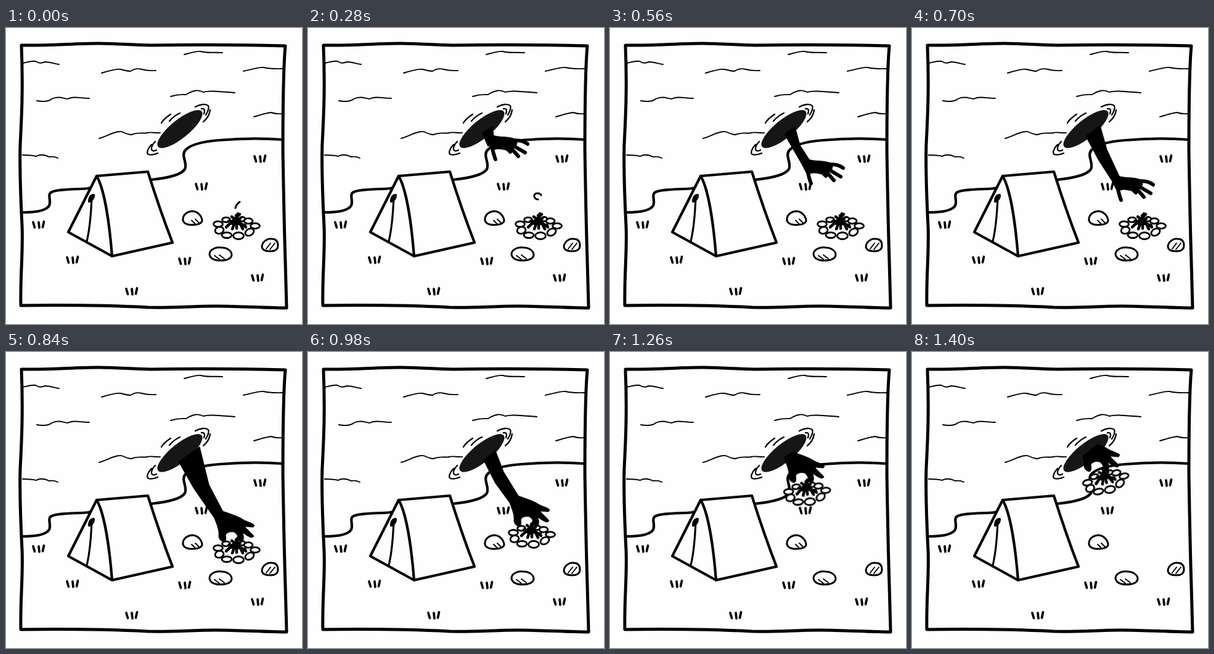
Write an HTML page that moves like this. It is 480 by 480 pixels and loops after 1540 ms.

```html
<!DOCTYPE html>
<html lang="en">
<head>
<meta charset="utf-8">
<title>Campfire thief</title>
<style>
html, body { margin: 0; width: 100%; height: 100%; overflow: hidden; background: #fefefe; }
svg { display: block; width: 100%; height: 100%; }
.ink { fill: none; stroke: #000; stroke-linecap: round; stroke-linejoin: round; }
.paper { fill: #fefefe; }
.solid { fill: #000; }
.thin { stroke-width: 1.9; }
.mid { stroke-width: 3; }
.bold { stroke-width: 4.2; }

/* Eleven held poses of 140 ms each */
.fire, .open, .grab, .arm, .smoke { animation: 1540ms step-end infinite; }
.fire { animation-name: fire; transform-origin: 374px 323px; }
.open { animation-name: open; }
.grab { animation-name: grab; }
.arm { animation-name: arm; }
.smoke { animation-name: smoke; }

@keyframes fire {
  0% { transform: none; }
  63.63% { transform: translate(-11px, -25px); }
  72.72% { transform: translate(-33px, -59px); }
  81.81% { transform: translate(-54px, -94px) rotate(-5deg); }
  90.9%, 100% { transform: translate(-59px, -113px) rotate(-13deg); }
}
@keyframes open {
  0% { visibility: hidden; transform: none; }
  9.09% { visibility: visible; transform: translate(-48px, -72px); }
  18.18% { visibility: visible; transform: translate(-22px, -39px); }
  27.27% { visibility: visible; transform: translate(-11px, -20px); }
  36.36% { visibility: visible; transform: none; }
  45.45% { visibility: visible; transform: translate(13px, 27px); }
  54.54%, 100% { visibility: hidden; transform: none; }
}
@keyframes grab {
  0% { visibility: hidden; transform: none; }
  54.54% { visibility: visible; transform: none; }
  63.63% { visibility: visible; transform: translate(-11px, -25px); }
  72.72% { visibility: visible; transform: translate(-33px, -59px); }
  81.81% { visibility: visible; transform: translate(-55px, -96px); }
  90.9%, 100% { visibility: visible; transform: translate(-66px, -114px); }
}
@keyframes arm {
  0% { d: none; }
  18.18% { d: path("M283,170 L287,181 L292,192 L303,178 L301,174 L299,160 Z"); }
  27.27% { d: path("M284,172 L291,185 L300,200 L313,192 L303,176 L299,160 Z"); }
  36.36% { d: path("M283,172 L296,195 L310,219 L323,213 L308,190 L300,160 Z"); }
  45.45% { d: path("M282,176 L303,215 L323,246 L336,240 L316,197 L305,158 Z"); }
  54.54% { d: path("M280,178 L305,222 L337,268 L352,259 L329,215 L314,154 Z"); }
  63.63% { d: path("M285,176 L304,213 L326,243 L341,233 L317,194 L304,160 Z"); }
  72.72% { d: path("M286,172 L296,192 L304,208 L319,199 L305,178 L299,162 Z"); }
  81.81%, 100% { d: none; }
}
@keyframes smoke {
  0% { d: path("M372,292 C373,287 376,284 379,282"); }
  9.09% { d: path("M374,285 C370,281 371,275 377,273"); }
  18.18% { d: path("M373,278 C366,278 364,268 372,268 C375,268 377,269 378,271"); }
  27.27% { d: path("M372,282 C371,279 372,277 374,275"); }
  36.36%, 100% { d: none; }
}
</style>
</head>
<body>
<svg viewBox="0 0 480 480">
  <defs>
    <filter id="rough" filterUnits="userSpaceOnUse" x="0" y="0" width="480" height="480" color-interpolation-filters="sRGB">
      <feTurbulence type="fractalNoise" baseFrequency=".25" numOctaves="2" seed="4"/>
      <feDisplacementMap in="SourceGraphic" scale="1.3" xChannelSelector="R" yChannelSelector="G"/>
    </filter>
    <clipPath id="below">
      <path d="M246,193 L318,135 H480 V480 H246 Z"/>
    </clipPath>
    <path id="tuft" d="M-9,-4 L-6.5,4.5 M0,-4 L1,5 M8.5,-5 L6.5,4"/>
  </defs>

  <g class="ink" filter="url(#rough)">
    <!-- sky -->
    <path class="thin" d="M27,57 C36,55 42,53 48,54 C54,58 58,57 63,55 C72,55 78,58 86,59
      M155,73 C165,70 178,66 185,67 C192,68 195,70 202,70 C208,66 213,65 220,67 C230,70 236,69 243,69
      M289,43 C300,40 310,37 316,38 C325,41 335,39 351,40
      M385,70 C400,67 410,63 418,64 C430,67 440,66 449,66
      M267,111 C280,107 286,108 292,108 C305,100 312,100 320,104 C330,101 345,103 371,105
      M402,144 C412,141 425,137 430,137 C438,140 443,139 449,139
      M50,118 C60,120 70,119 74,115 C85,110 92,114 100,115 C110,110 120,114 135,114
      M151,179 C165,175 172,169 184,168 C190,167 194,173 203,173 C215,168 222,172 229,170 C236,168 243,171 250,170
      M27,206 C40,206 45,207 49,208 C56,204 64,206 70,209 C76,208 80,209 84,211"/>

    <!-- shore -->
    <path class="bold" d="M27,299 C45,299 65,297 70,288 C74,280 66,270 74,266 C85,261 110,262 136,260
      M236,246 C255,244 283,240 290,229 C295,219 283,207 291,198 C300,188 320,184 345,182 C380,179 420,179 449,181"/>

    <!-- tent -->
    <g class="bold">
      <path class="paper" d="M147,240 L230,233 C241,268 256,312 270,348 L172,370 L101,331 Z"/>
      <path d="M147,240 C160,262 168,320 172,370"/>
      <path stroke-width="3.2" d="M131,346 C136,325 138,300 139,274"/>
      <path class="solid" d="M135,281 C135,275 138,271 142,271 C142,275 140,279 135,281 Z"/>
    </g>

    <!-- grass -->
    <g stroke-width="3.7">
      <use href="#tuft" x="53" y="319"/>
      <use href="#tuft" x="108" y="376"/>
      <use href="#tuft" x="204" y="427"/>
      <use href="#tuft" x="290" y="378"/>
      <use href="#tuft" x="408" y="405"/>
      <use href="#tuft" x="412" y="212"/>
      <use href="#tuft" x="317" y="257"/>
    </g>

    <!-- rocks -->
    <g class="mid">
      <path class="paper" d="M287,309 C288,301 296,297 303,297 C312,298 318,306 318,313 C316,319 305,320 297,319 C290,318 286,314 287,309 Z"/>
      <path class="paper" d="M330,366 C331,359 340,355 349,356 C358,356 366,361 366,368 C365,375 357,377 347,377 C337,377 330,373 330,366 Z"/>
      <path class="paper" d="M415,354 C416,346 424,341 431,342 C438,342 441,346 441,353 C441,359 436,362 429,362 C421,362 415,360 415,354 Z"/>
      <path class="thin" d="M301,312 L307,318 M307,310 L313,316 M338,369 L346,375 M346,368 L354,374 M422,358 L429,349 M428,359 L436,349"/>
    </g>

    <!-- hole -->
    <ellipse fill="#161616" stroke="none" cx="282" cy="163.8" rx="45.5" ry="14.8" transform="rotate(-39 282 163.8)"/>
    <path stroke-width="2.3" d="M252,154 C256,147 261,144 267,140 M265,151 C270,145 275,141 282,138
      M307,128 C314,124 324,122 328,126 C330,130 327,136 324,141
      M317,131 C322,130 323,133 321,139 M331,133 C330,141 326,147 320,152
      M242,184 C236,190 234,197 238,199 C240,200 242,199 244,198
      M236,189 C230,195 227,203 231,205 C236,207 241,205 246,203"/>

    <path class="smoke" stroke-width="3"/>

    <!-- campfire -->
    <g class="fire">
      <ellipse class="paper" stroke="none" cx="374" cy="323" rx="33" ry="16"/>
      <g class="paper" stroke-width="2.8">
        <ellipse cx="357" cy="311" rx="6.5" ry="3.8"/>
        <ellipse cx="383" cy="310" rx="5" ry="3.5"/>
        <ellipse cx="393" cy="313" rx="7" ry="4.3"/>
        <ellipse cx="344" cy="318" rx="7.5" ry="4.5"/>
        <ellipse cx="404" cy="321" rx="7.5" ry="4.3"/>
        <ellipse cx="346" cy="328" rx="7" ry="5.5" transform="rotate(-15 346 328)"/>
        <ellipse cx="395" cy="331" rx="7.5" ry="5.3" transform="rotate(-30 395 331)"/>
        <ellipse cx="358" cy="336" rx="8" ry="4.5"/>
        <ellipse cx="377" cy="337" rx="8.5" ry="5.5"/>
      </g>
      <path stroke-width="4.5" d="M357,323 L379,302 M367,326 L376,301 M389,323 L366,306 M384,326 L373,304 M361,313 L388,320 M374,325 L374,310 M366,317 L380,309"/>
    </g>

    <!-- arm -->
    <g clip-path="url(#below)">
      <path class="arm solid" stroke-width="1"/>
      <g class="open">
        <path class="solid" stroke-width="1" d="M310,218 L322,213 C332,217 345,214 358,219 C364,224 360,234 350,238 C340,237 331,233 326,236 L318,234 Z"/>
        <path stroke-width="6" d="M317,222 C321,232 322,242 326,252 M350,222 C362,220 372,222 378,227 M352,228 L374,241 M348,230 L363,247 M340,230 L350,240"/>
      </g>
      <path class="grab solid" stroke-width="1" d="M337,267 L351,258 C362,262 372,265 380,269 C390,276 398,276 403,281 L401,284 C394,284 389,282 388,284 C393,290 400,295 402,299 L398,301 C392,299 385,294 383,292 C386,298 386,304 383,308 L378,306 C377,300 374,294 370,292 C364,291 358,292 356,297 C357,302 357,306 354,308 C348,307 345,303 345,298 C346,290 343,282 337,267 Z"/>
    </g>

    <!-- border -->
    <path stroke-width="5" d="M25,28 C70,29 110,25 150,25 C185,25 205,28 235,28 C300,27 380,27 453,29
      C449,70 449,150 449,200 C450,260 451,320 453,380 L455,454
      C420,454 380,451 340,451 C300,451 270,454 230,453 C170,450 100,449 24,450
      C23,400 28,360 26,320 C24,280 22,230 23,190 C25,150 28,100 25,28 Z"/>
  </g>
</svg>
</body>
</html>
```
